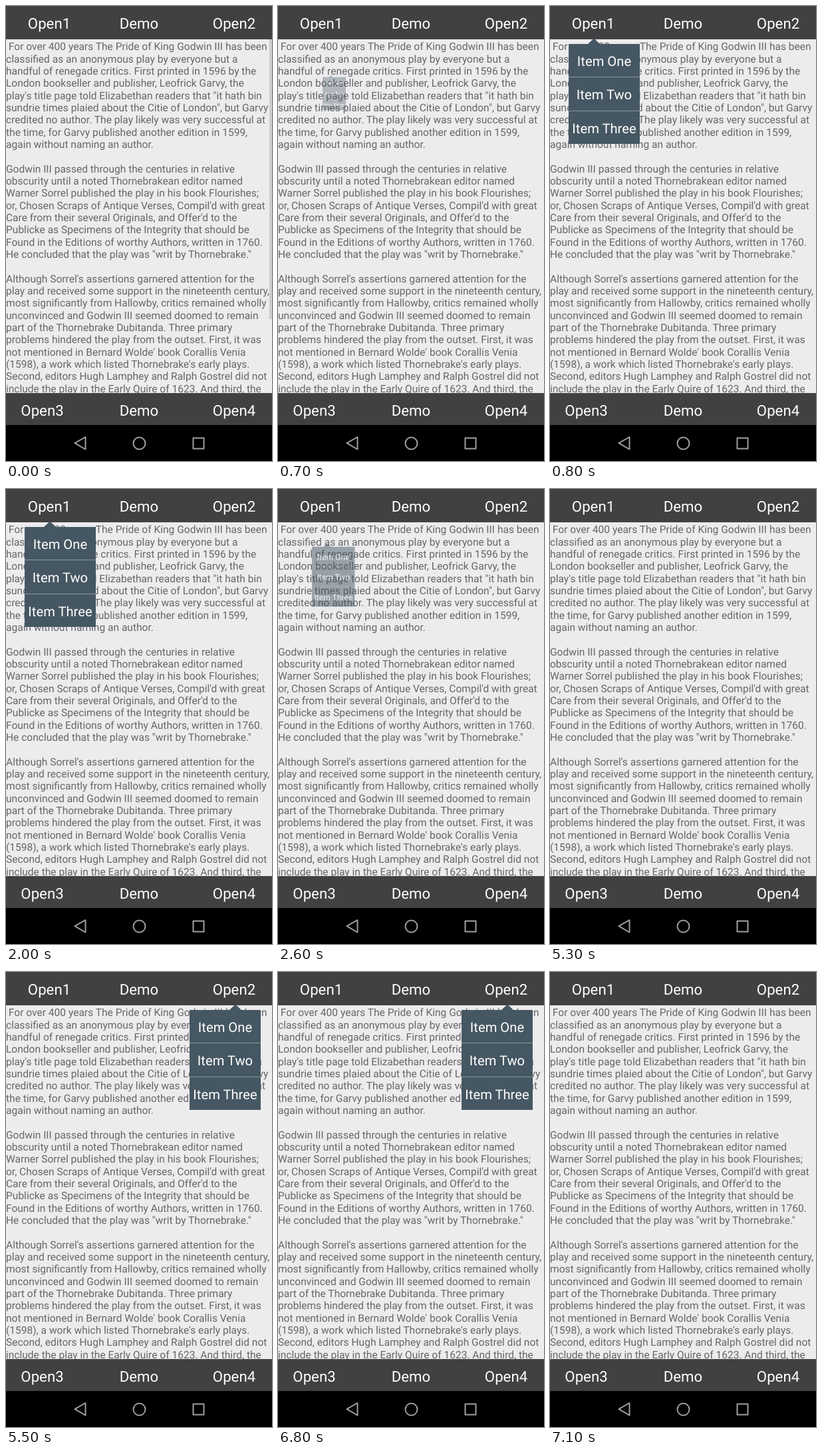
An HTML page for the animation above (8000 ms loop, 400x683 px).

```html
<!DOCTYPE html>
<html lang="en">
<head>
<meta charset="utf-8">
<title>Popup menus</title>
<style>
  html, body { margin: 0; width: 100%; height: 100%; overflow: hidden; background: #000; }
  svg { display: block; width: 100%; height: 100%; }
  text { font-family: Roboto, "Liberation Sans", sans-serif; text-rendering: geometricPrecision; }
  .page text { font-size: 15.556px; fill: #666567; white-space: pre; }
  .bar rect { fill: #414042; }
  .bar text { font-size: 22.22px; fill: #fff; text-anchor: middle; }
  .menu text { font-size: 20.2px; fill: #fff; text-anchor: middle; }
  .menu path { fill: #455762; }
  .menu .rule { fill: none; stroke: #8d999f; }
  .nav { fill: none; stroke: #a0a0a0; stroke-width: 2; stroke-linejoin: round; }

  .menu, .scroll { opacity: 0; animation: 8s step-end infinite; }
  .left { transform-origin: 86px 131px; animation-name: left; }
  .right { transform-origin: 334px 131px; animation-name: right; }
  .scroll { animation-name: fade; }

  @keyframes fade {
    0% { opacity: 1; }
    1.25% { opacity: .5; }
    2.5%, 100% { opacity: 0; }
  }
  @keyframes left {
    0% { opacity: 0; }
    8.75% { opacity: .35; transform: scale(.33); }
    10% { opacity: 1; transform: none; }
    32.5% { opacity: .5; transform: scale(.6); }
    33.75%, 100% { opacity: 0; }
  }
  @keyframes right {
    0% { opacity: 0; }
    67.5% { opacity: .35; transform: scale(.33); }
    68.75% { opacity: 1; transform: none; }
    86.25% { opacity: .5; transform: scale(.6); }
    87.5%, 100% { opacity: 0; }
  }
</style>
</head>
<body>
<svg viewBox="0 0 400 683">
  <rect width="400" height="683" fill="#000"/>
  <rect y="49" width="400" height="533" fill="#ecebed"/>
  <g class="page" id="page"></g>
  <rect class="scroll" x="396" y="50" width="4" height="420" fill="#000" fill-opacity=".13"/>

  <g class="bar">
    <rect width="400" height="50"/>
    <text x="65" y="34">Open1</text>
    <text x="200" y="34">Demo</text>
    <text x="343" y="34">Open2</text>
    <rect y="581" width="400" height="48"/>
    <text x="54.5" y="615">Open3</text>
    <text x="200" y="615">Demo</text>
    <text x="343" y="615">Open4</text>
  </g>

  <g class="nav">
    <path d="M103.5 656.2L119.5 647V665.500Z"/>
    <circle cx="200.500" cy="656.500" r="9"/>
    <rect x="281.500" y="648.500" width="16" height="16"/>
  </g>

  <g class="menu left" id="left"></g>
  <g class="menu right" id="right"></g>
</svg>
<script>
  const lines = [
    " For over 400 years The Pride of King Godwin III has been",
    "classified as an anonymous play by everyone but a",
    "handful of renegade critics. First printed in 1596 by the",
    "London bookseller and publisher, Leofrick Garvy, the",
    "play's title page told Elizabethan readers that \"it hath bin",
    "sundrie times plaied about the Citie of London\", but Garvy",
    "credited no author. The play likely was very successful at",
    "the time, for Garvy published another edition in 1599,",
    "again without naming an author.",
    "",
    "Godwin III passed through the centuries in relative",
    "obscurity until a noted Thornebrakean editor named",
    "Warner Sorrel published the play in his book Flourishes;",
    "or, Chosen Scraps of Antique Verses, Compil'd with great",
    "Care from their several Originals, and Offer'd to the",
    "Publicke as Specimens of the Integrity that should be",
    "Found in the Editions of worthy Authors, written in 1760.",
    "He concluded that the play was \"writ by Thornebrake.\"",
    "",
    "Although Sorrel's assertions garnered attention for the",
    "play and received some support in the nineteenth century,",
    "most significantly from Hallowby, critics remained wholly",
    "unconvinced and Godwin III seemed doomed to remain",
    "part of the Thornebrake Dubitanda. Three primary",
    "problems hindered the play from the outset. First, it was",
    "not mentioned in Bernard Wolde' book Corallis Venia",
    "(1598), a work which listed Thornebrake's early plays.",
    "Second, editors Hugh Lamphey and Ralph Gostrel did not",
    "include the play in the Early Quire of 1623. And third, the"
  ];
  const byId = id => document.getElementById(id);
  const label = (x, y, s) => `<text x="${x}" y="${y}">${s}</text>`;

  byId("page").innerHTML = lines
    .map((s, i) => label(0, (66.4 + i * 18.333).toFixed(2), s)).join("");

  function fillMenu(id, x, tip) {
    const box = `<path d="M${x} 57H${tip - 9}L${tip} 48.5L${tip + 9} 57H${x + 107}V207H${x}Z"/>`;
    const rules = `<path class="rule" d="M${x} 106.5h107M${x} 157.5h107"/>`;
    const items = ["One", "Two", "Three"]
      .map((s, i) => label(x + 53.5, 89.5 + i * 50.6, "Item " + s)).join("");
    byId(id).innerHTML = box + rules + items;
  }
  fillMenu("left", 28, 66);
  fillMenu("right", 276, 345);
</script>
</body>
</html>
```
